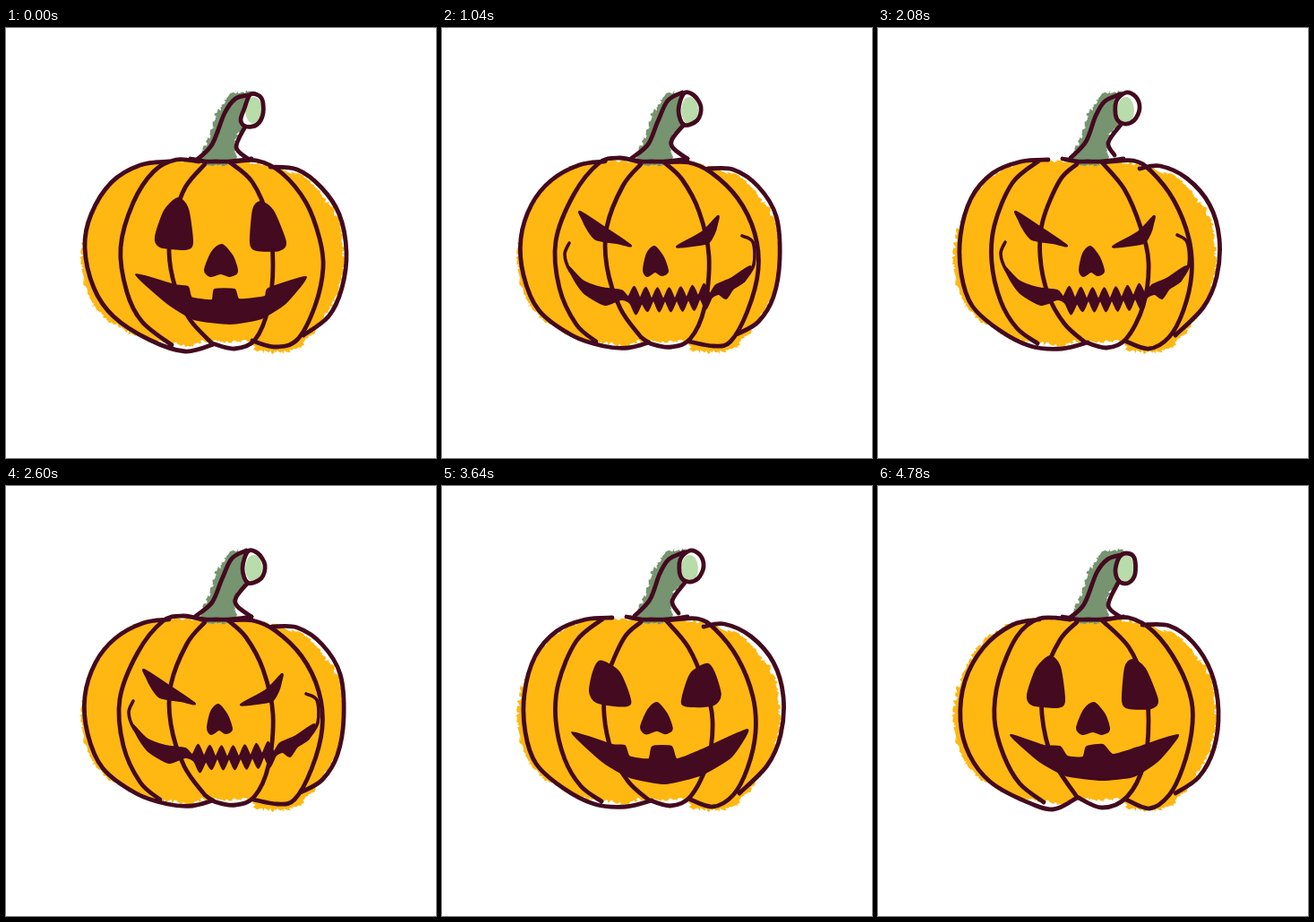
An HTML page for the animation above (4.88 s loop, 480 by 480 pixels).

```html
<!DOCTYPE html>
<html lang="en">
<head>
<meta charset="utf-8">
<title>Pumpkin</title>
<style>
  html, body { margin: 0; width: 100%; height: 100%; overflow: hidden; background: #fff; }
  svg { display: block; width: 100%; height: 100%; }
  .ink { fill: none; stroke: #430a20; stroke-width: 4.8; stroke-linecap: round; stroke-linejoin: round; }
  .solid { fill: #430a20; stroke-width: 2; }
</style>
</head>
<body>
<svg viewBox="0 0 480 480">
  <path id="flesh" fill="#ffb711"/>
  <path id="green" fill="#76946f"/>
  <path id="capBack" fill="#fff"/>
  <ellipse id="capFill" cx="276.5" cy="92" rx="9.5" ry="15" fill="#b8dcaa"/>
  <path id="lines" class="ink"/>
  <path id="stem" class="ink" stroke-width="4"/>
  <path id="cheeks" class="ink" style="stroke-width:3.6"/>
  <path id="face" class="ink solid"/>
</svg>
<script>
const LOOP = 4880, STEP = 130;
const $ = id => document.getElementById(id);
const pts = text => text.split(' ').map(p => p.split(',').map(Number));

// Cardinal spline through points
function curve(points, closed = false, k = 1 / 6) {
  const n = points.length;
  const at = i => closed ? points[(i + n) % n] : points[Math.max(0, Math.min(n - 1, i))];
  let d = 'M' + points[0];
  for (let i = 0; i < (closed ? n : n - 1); i++) {
    const [a, b, c, e] = [at(i - 1), at(i), at(i + 1), at(i + 2)];
    const out = b.map((v, j) => (v + (c[j] - a[j]) * k).toFixed(1));
    const into = c.map((v, j) => (v - (e[j] - b[j]) * k).toFixed(1));
    d += `C${out} ${into} ${c}`;
  }
  return closed ? d + 'Z' : d;
}

let seed = 7;
const random = () => (seed = seed * 16807 % 2147483647) / 2147483647;

// Dry-brush edge
function roughen(id, text, amount) {
  const path = $(id);
  path.setAttribute('d', curve(pts(text), true));
  const length = path.getTotalLength(), edge = [];
  for (let s = 0; s < length; s += 1.7) {
    const p = path.getPointAtLength(s);
    edge.push([p.x, p.y].map(v => (v + (random() - .5) * amount).toFixed(1)));
  }
  path.setAttribute('d', 'M' + edge.join('L') + 'Z');
}

roughen('flesh', '230,150 180,148 150,153 115,175 97,205 86,240 85,270 92,300 112,325 150,345 200,354 226,349 248,351 272,350 280,360 315,361 334,350 350,330 371,295 377,255 372,215 355,190 338,169 318,162 300,155 260,149', 4.5);
roughen('green', '216,144 228,120 235,96 249,76 268,71 275,80 270,106 256,124 256,148 240,154 224,150', 4.5);

// Each drawing: left side, four ribs, right side; then stem left, cap, stem right
const drawing = (body, left, cap, right) => ({
  body: body.map(b => curve(pts(b))).join(''),
  cap: curve(pts(cap), true),
  stem: curve(pts(left)) + curve(pts(right))
});

const TOP = '206,146 222,149 234,149 250,149 274,146';

const opening = drawing([TOP,
  '182,149 150,153 118,172 95,208 88,245 98,290 120,322 160,348 200,361 232,353',
  '215,149 190,147 165,160 142,195 128,245 135,295 152,328 185,354',
  '222,152 200,178 187,215 182,250 189,290 205,325 230,352',
  '230,352 255,358 278,348 293,312 298,265 293,215 275,172 250,150',
  '250,150 280,148 308,162 335,195 350,235 354,268 345,310 325,348 300,356 275,349',
  '295,155 325,158 352,178 372,208 380,250 375,290 360,322 332,343'],
  '212,148 230,130 244,95 256,79 270,75', '273,74 285,78 287,95 280,108 268,110 262,103 266,90', '267,110 257,133 270,146');

const closing = drawing([TOP,
  '180,149 150,155 118,180 97,218 92,262 102,300 125,330 160,350 195,361 222,348',
  '215,149 180,148 155,168 135,215 130,260 140,300 158,332 185,353',
  '222,152 203,172 186,212 183,255 195,305 222,347',
  '222,347 250,359 278,347 297,310 302,262 297,220 280,180 250,150',
  '250,150 280,147 308,163 335,200 350,240 350,275 340,315 325,345 303,360 277,350',
  '295,155 325,156 352,175 372,208 380,250 375,293 358,325 332,343'],
  '213,148 230,132 244,97 256,82 271,77', '277,75 286,80 287,98 280,108 270,107 265,95 269,80', '268,108 257,133 270,146');

const cycle = [
  drawing([TOP,
    '182,148 150,154 118,176 97,213 92,255 98,296 121,328 155,350 200,361 234,353',
    '210,146 175,148 150,172 133,220 130,262 140,300 155,332 178,352',
    '220,152 203,174 187,214 185,258 195,303 213,337 232,352',
    '232,352 252,360 275,350 292,315 298,268 293,225 277,182 248,150',
    '248,150 285,147 312,163 335,197 350,240 353,275 342,320 325,350 312,358 277,350',
    '290,153 320,160 350,180 370,205 380,245 380,285 365,318 332,344'],
    '213,148 228,136 240,108 252,87 278,79', '280,78 288,84 284,100 272,109 262,102 264,88', '268,109 256,130 268,143'),
  drawing([TOP,
    '190,147 160,149 128,162 104,190 92,232 93,275 105,310 135,337 170,355 205,358 234,351',
    '180,148 150,173 130,220 127,262 137,305 155,335 178,352',
    '222,152 203,170 184,215 181,255 190,298 208,330 230,350',
    '230,350 255,357 277,347 296,310 302,262 293,222 275,180 250,150',
    '252,150 285,148 305,160 330,192 347,235 350,275 341,315 325,345 302,358 275,349',
    '292,157 315,154 345,168 370,197 381,235 378,278 363,312 332,343'],
    '215,145 232,127 243,98 253,82 270,74', '277,72 288,77 292,90 286,103 275,107 266,100 266,82', '271,108 257,128 264,142'),
  drawing([TOP,
    '182,149 153,153 122,170 100,197 88,235 91,276 108,315 145,343 180,355 208,357 231,351',
    '222,150 198,145 175,151 147,186 127,238 131,290 150,331 172,350',
    '222,152 202,176 184,222 184,266 199,313 222,345',
    '222,345 235,353 256,356 277,347 293,312 298,255 287,205 268,169 248,150',
    '250,150 275,150 300,161 330,190 349,229 353,270 341,316 322,350 303,355 276,350',
    '297,157 325,158 353,177 373,210 377,258 370,300 353,328 329,342'],
    '212,145 230,130 241,104 252,81 268,72', '270,73 281,75 289,88 285,103 270,108 264,92', '270,108 257,124 258,134 274,146')
];

const look = (left, right, nose) => [left, right, nose].map(pts);
const happy = look('192,190 203,202 208,240 200,247 172,244 167,233 177,204',
  '284,194 276,203 273,240 280,248 305,248 312,239 298,204',
  '241,242 253,255 258,272 250,277 240,274 228,277 222,270 230,250');
const sly = look('160,210 188,217 207,240 196,243 180,240 168,230 163,219',
  '311,208 284,217 267,241 280,243 297,238 306,226 309,215',
  '238,242 248,254 255,270 248,275 239,271 228,276 222,268 230,250');
const evil = look('154,205 182,223 211,243 195,240 172,236 162,224 157,214',
  '308,210 290,228 262,244 280,243 297,240 304,229 307,219',
  '237,244 247,256 252,272 245,276 238,272 229,277 225,270 229,252');
const wide = look('154,204 190,217 214,244 192,243 173,237 162,224 157,213',
  '314,206 280,220 260,245 283,243 300,239 309,224 312,214',
  sly[2].join(' '));
const moods = [[0, happy], [2, happy], [5, sly], [8, evil], [20, evil], [25, wide], [30, happy], [40, happy]];

function lookAt(frame) {
  const k = moods.findIndex(m => m[0] > frame);
  const [[start, from], [end, to]] = [moods[k - 1], moods[k]];
  const u = (frame - start) / (end - start);
  return from.map((shape, s) => shape.map((p, i) => p.map((v, j) => v + (to[s][i][j] - v) * u)));
}

const smile = text => curve(pts(text), true, .09);
const smiles = {
  first: smile('145,275 188,287 203,289 207,301 230,304 233,292 255,292 260,303 289,300 293,291 335,278 312,307 285,324 250,330 210,325 180,307'),
  usual: smile('145,275 190,289 204,290 209,302 231,305 235,291 256,291 262,305 289,295 341,272 323,302 290,322 250,332 210,325 180,308'),
  last: smile('148,278 185,290 203,291 211,302 229,303 233,291 251,289 262,300 290,292 335,278 312,307 285,324 250,328 210,323 180,307')
};

// Winged grin with a zigzag of teeth
function grin(amp, drift) {
  const top = [], bottom = [];
  for (let i = 0; i <= 14; i++) {
    const x = 207 + i * 6.5 + drift, sag = 4 * Math.sin(i / 14 * Math.PI) - i * .25;
    const bite = i % 2 ? amp : -amp;
    top.push([x, 294 + sag - bite]);
    bottom.unshift([x + 2, 309 + sag * .6 + bite + (i < 3 ? 4 : 0)]);
  }
  return curve([
    ...pts('141,266 157,282 178,290 200,293'), ...top,
    ...pts('306,287 322,280 344,266 337,283 325,291 317,302 309,297'), ...bottom,
    ...pts('200,303 182,309 160,297 149,283')
  ], true, .12);
}

const cheekLines = [
  '143,236 137,249 143,268 156,284|333,231 345,243 349,267 336,280',
  '142,239 137,252 143,270 156,284|334,231 345,239 347,264 337,282',
  '142,240 137,253 143,271 156,284|335,232 347,239 348,264 337,282'
].map(pair => pair.split('|').map(s => curve(pts(s))).join(''));

function draw(time) {
  const t = time % LOOP;
  const frame = t < 4650 ? Math.min(35, Math.floor(t / STEP)) : 36 + Math.floor((t - 4650) / 65);
  const first = frame === 0, last = frame > 37, phase = frame % 3;
  const shape = first ? opening : last ? closing : cycle[phase];
  const grinning = frame > 2 && frame < 28, fierce = frame > 7 && frame < 23;
  const mouth = grinning ? grin(fierce ? 6 : 4.8, phase - 1)
    : smiles[first ? 'first' : last ? 'last' : 'usual'];

  $('lines').setAttribute('d', shape.body);
  $('capBack').setAttribute('d', shape.cap);
  $('stem').setAttribute('d', shape.stem + shape.cap);
  $('cheeks').setAttribute('d', fierce ? cheekLines[phase] : '');
  $('face').setAttribute('d', lookAt(frame).map(p => curve(p, true, .13)).join('') + mouth);
}

const begin = performance.now();
function tick() {
  draw(performance.now() - begin);
  requestAnimationFrame(tick);
}
tick();
</script>
</body>
</html>
```
